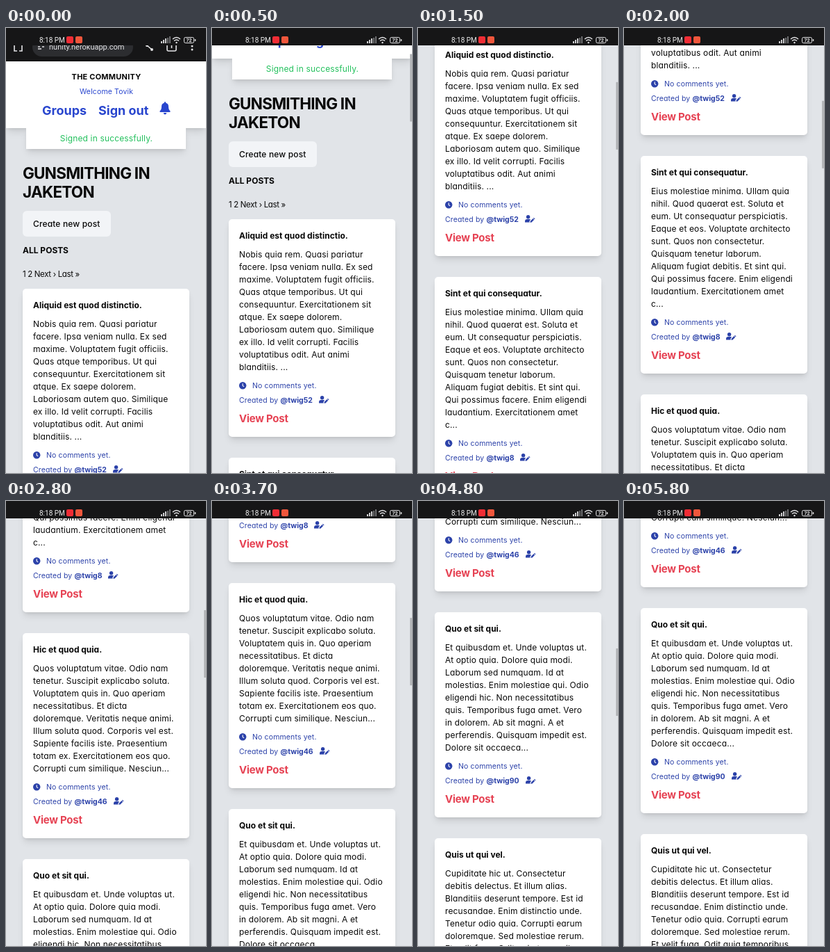
These frames come from a looping animation (288 px wide and 640 px high, 5900 ms). An HTML page:

```html
<!DOCTYPE html>
<html lang="en">
<head>
<meta charset="utf-8">
<title>The Community</title>
<style>
@property --s { syntax: "<integer>"; inherits: true; initial-value: 0; }

html, body { margin: 0; width: 100%; height: 100%; overflow: hidden; }

body {
  position: relative;
  background: #e1e4e8;
  color: #080808;
  font: 12px/18px Inter, "Open Sans", sans-serif;
  font-feature-settings: "cv11";
  font-optical-sizing: none;
  letter-spacing: .012em;
  white-space: nowrap;
  animation: scroll 5900ms -4ms infinite;
}

/* --s is the scroll offset, moved once every 100 ms */
@keyframes scroll {
  0%      { --s: 0;    animation-timing-function: steps(11); }
  18.644% { --s: 221;  animation-timing-function: steps(9); }
  33.898% { --s: 534;  animation-timing-function: steps(8); }
  47.458% { --s: 871;  animation-timing-function: steps(3); }
  52.542% { --s: 923;  animation-timing-function: steps(3); }
  57.627% { --s: 941;  animation-timing-function: steps(3); }
  62.712% { --s: 943;  animation-timing-function: steps(3); }
  67.797% { --s: 1015; animation-timing-function: steps(4); }
  74.576% { --s: 1160; animation-timing-function: steps(4); }
  81.356% { --s: 1226; animation-timing-function: steps(3); }
  86.441%, 100% { --s: 1232; }
}
@keyframes thumb {
  0%, 1.69% { opacity: 0; }
  1.7%, 91.5% { opacity: 1; }
  96.6%, 100% { opacity: 0; }
}

svg { display: block; position: absolute; overflow: visible; }
.page {
  position: absolute; inset: 0;
  transform: translateY(calc(var(--s) * -1px));
}
.page > *, .status > *, .toolbar > * { position: absolute; }
.line { top: calc(var(--y) * 1px - 9px); left: calc(var(--x) * 1px); }
.mid { left: 0; width: 289px; text-align: center; }
.bold { font-weight: 700; letter-spacing: 0; }
.blue { color: #2946ce; }

.status {
  position: absolute; left: 0; top: 0; width: 288px; height: 25px;
  background: #161617; color: #eee;
}
.status .line { font: 10px/18px Roboto, sans-serif; letter-spacing: 0; }
.app { top: 12px; width: 10px; height: 10px; border-radius: 2px; }

.toolbar { left: 0; top: 0; width: 288px; height: 48px; background: #161617; color: #e4e4e6; }
.pill { left: 38px; top: 14px; width: 145px; height: 27px; border-radius: 14px; background: #2c2d30; }
.toolbar .line { font: 11px/18px Roboto, sans-serif; letter-spacing: 0; }

.head { left: 0; top: 48px; width: 288px; height: 96px; background: #fff; }
.notice { left: 29px; top: 144px; width: 230px; height: 30px; background: #fff; }
.head, .notice, .card {
  box-shadow: 0 7px 11px -2px rgba(0,0,0,.1), 0 3px 5px -2px rgba(0,0,0,.1);
}
.nav { font-size: 18px; }
h1 { margin: 0; left: 24px; top: 195px; font: 700 22.5px/27px Inter, sans-serif; letter-spacing: -.034em; }
.button {
  left: 24px; top: 263px; width: 127px; height: 37px;
  border-radius: 6px; background: #f2f4f7;
  font-weight: 500; line-height: 37px; text-indent: 15px;
}
.pager { font-size: 11.5px; letter-spacing: -.03em; }

.posts { left: 24px; top: 375px; width: 240px; }
.card { box-sizing: border-box; margin-bottom: 30px; padding: 15px; border-radius: 5px; background: #fff; }
.card p { margin: 9px 0 6.5px; }
.meta { position: relative; height: 21px; color: #2c42a9; font-size: 10.5px; line-height: 21px; }
.meta b { letter-spacing: 0; }
.clock { left: 0; top: 5px; }
.note { padding-left: 19px; }
.meta .writer { display: inline-block; position: static; margin-left: 9px; vertical-align: -1px; }
.view { margin-top: 5.5px; color: #e64354; font-size: 15px; font-weight: 700; line-height: 22px; letter-spacing: -.017em; }

.thumb {
  position: absolute; right: 0; top: 22px; width: 3px; height: 97px;
  background: #b4b6b9;
  transform: translateY(calc(var(--s) * .155px));
  animation: thumb 5900ms -4ms infinite;
}
</style>
</head>
<body>
<div class="page">
  <div class="toolbar">
    <div class="pill"></div>
    <svg width="288" height="48" fill="none" stroke="#e4e4e6" stroke-width="1.6">
      <path d="M12 24v9h4M19 33h4v-9M232 24v7q0 2 2 2h9q2 0 2-2v-7M238.500 23v6M203 25l7 6"/>
      <path d="M46 27h3m3 0h3M46 30h5"/>
      <g fill="#e4e4e6" stroke="none">
        <circle cx="210" cy="31" r="2"/><circle cx="203" cy="25" r="2"/>
        <circle cx="268" cy="26" r="1.500"/><circle cx="268" cy="31" r="1.500"/>
      </g>
    </svg>
    <div class="line" style="--x:62;--y:28">nunity.herokuapp.com</div>
  </div>

  <div class="head"></div>
  <div class="notice"></div>
  <div class="line mid bold" style="--y:70;--x:0;font-size:11px;letter-spacing:.02em">THE COMMUNITY</div>
  <div class="line mid blue" style="--y:92;--x:0;font-size:10.5px">Welcome Tovik</div>
  <div class="line nav bold blue" style="--x:52;--y:118.500">Groups</div>
  <div class="line nav bold blue" style="--x:133;--y:118.500">Sign out</div>
  <svg style="left:221px;top:106px" width="16" height="19" fill="#2946ce">
    <path d="M8 0q1.200 0 1.200 1.700Q13 2.600 13 7q0 4.500 2.500 6.500Q16 15 14.500 15h-13Q0 15 .5 13.500 3 11.500 3 7q0-4.400 3.800-5.300Q6.800 0 8 0zM5.700 16h4.600q-.3 2.400-2.300 2.400T5.700 16z"/>
  </svg>
  <div class="line mid" style="--y:159;--x:0;color:#22c05c">Signed in successfully.</div>

  <h1>GUNSMITHING IN<br>JAKETON</h1>
  <div class="button">Create new post</div>
  <div class="line bold" style="--x:24;--y:320">ALL POSTS</div>
  <div class="line pager" style="--x:24;--y:354">1 2 Next › Last »</div>
  <div class="posts"></div>
</div>

<div class="thumb"></div>

<div class="status">
  <div class="line" style="--x:48;--y:17.500">8:18 PM</div>
  <div class="app" style="left:87px;background:#f02c35"></div>
  <div class="app" style="left:100px;background:#f0563c"></div>
  <svg width="288" height="24" fill="none" stroke="#e4e4e6">
    <path stroke-width="1.800" d="M224 22v-3M227 22v-5M230 22v-7"/>
    <path stroke-width="1.800" stroke="#77787a" d="M233 22v-8M236 22v-10"/>
    <path stroke-width="1.500" d="M240 16q5.500-5 11 0M242 18.500q3.500-3 7 0"/>
    <circle cx="245.500" cy="21" r="1.200" fill="#e4e4e6" stroke="none"/>
    <rect x="256.500" y="13.500" width="14" height="8" rx="2"/>
    <path stroke-width="1.500" d="M272.500 16v3"/>
    <text x="263.500" y="20" text-anchor="middle" fill="#e4e4e6" stroke="none" style="font:700 7px Roboto,sans-serif;letter-spacing:0">72</text>
  </svg>
</div>

<script>
const posts = [
  ["Aliquid est quod distinctio.", "twig52",
   "Nobis quia rem. Quasi pariatur|facere. Ipsa veniam nulla. Ex sed|maxime. Voluptatem fugit officiis.|Quas atque temporibus. Ut qui|consequuntur. Exercitationem sit|atque. Ex saepe dolorem.|Laboriosam autem quo. Similique|ex illo. Id velit corrupti. Facilis|voluptatibus odit. Aut animi|blanditiis. ..."],
  ["Sint et qui consequatur.", "twig8",
   "Eius molestiae minima. Ullam quia|nihil. Quod quaerat est. Soluta et|eum. Ut consequatur perspiciatis.|Eaque et eos. Voluptate architecto|sunt. Quos non consectetur.|Quisquam tenetur laborum.|Aliquam fugiat debitis. Et sint qui.|Qui possimus facere. Enim eligendi|laudantium. Exercitationem amet|c..."],
  ["Hic et quod quia.", "twig46",
   "Quos voluptatum vitae. Odio nam|tenetur. Suscipit explicabo soluta.|Voluptatem quis in. Quo aperiam|necessitatibus. Et dicta|doloremque. Veritatis neque animi.|Illum soluta quod. Corporis vel est.|Sapiente facilis iste. Praesentium|totam ex. Exercitationem eos quo.|Corrupti cum similique. Nesciun..."],
  ["Quo et sit qui.", "twig90",
   "Et quibusdam et. Unde voluptas ut.|At optio quia. Dolore quia modi.|Laborum sed numquam. Id at|molestias. Enim molestiae qui. Odio|eligendi hic. Non necessitatibus|quis. Temporibus fuga amet. Vero|in dolorem. Ab sit magni. A et|perferendis. Quisquam impedit est.|Dolore sit occaeca..."],
  ["Quis ut qui vel.", "twig27",
   "Cupiditate hic ut. Consectetur|debitis delectus. Et illum alias.|Blanditiis deserunt tempore. Est id|recusandae. Enim distinctio unde.|Tenetur odio quia. Corrupti earum|doloremque. Sed molestiae rerum.|Et velit fuga. Odit quia temporibus."]
];

const clock = `<svg class="clock" width="11" height="11"><circle cx="5.2" cy="5.3" r="5.2" fill="#2c42a9"/>
  <path d="M5.200 2.300v3.200l2 1.400" fill="none" stroke="#fff" stroke-width="1.100"/></svg>`;
const writer = `<svg class="writer" width="14" height="11" fill="#2c42a9"><circle cx="4.600" cy="2.700" r="2.700"/>
  <path d="M0 10.500V9q0-3 3-3h3.500q1 0 1.700.6L6.500 8.500v2zM7.500 10.800l.3-2 3.700-3.700 1.700 1.700-3.700 3.700zM12 4.600l.8-.8 1.700 1.700-.8.8z"/></svg>`;

document.querySelector(".posts").innerHTML = posts.map(([title, user, text]) => `
  <div class="card">
    <div class="bold">${title}</div>
    <p>${text.replaceAll("|", "<br>")}</p>
    <div class="meta note">${clock}No comments yet.</div>
    <div class="meta">Created by <b>@${user}</b>${writer}</div>
    <div class="view">View Post</div>
  </div>`).join("");
</script>
</body>
</html>
```
